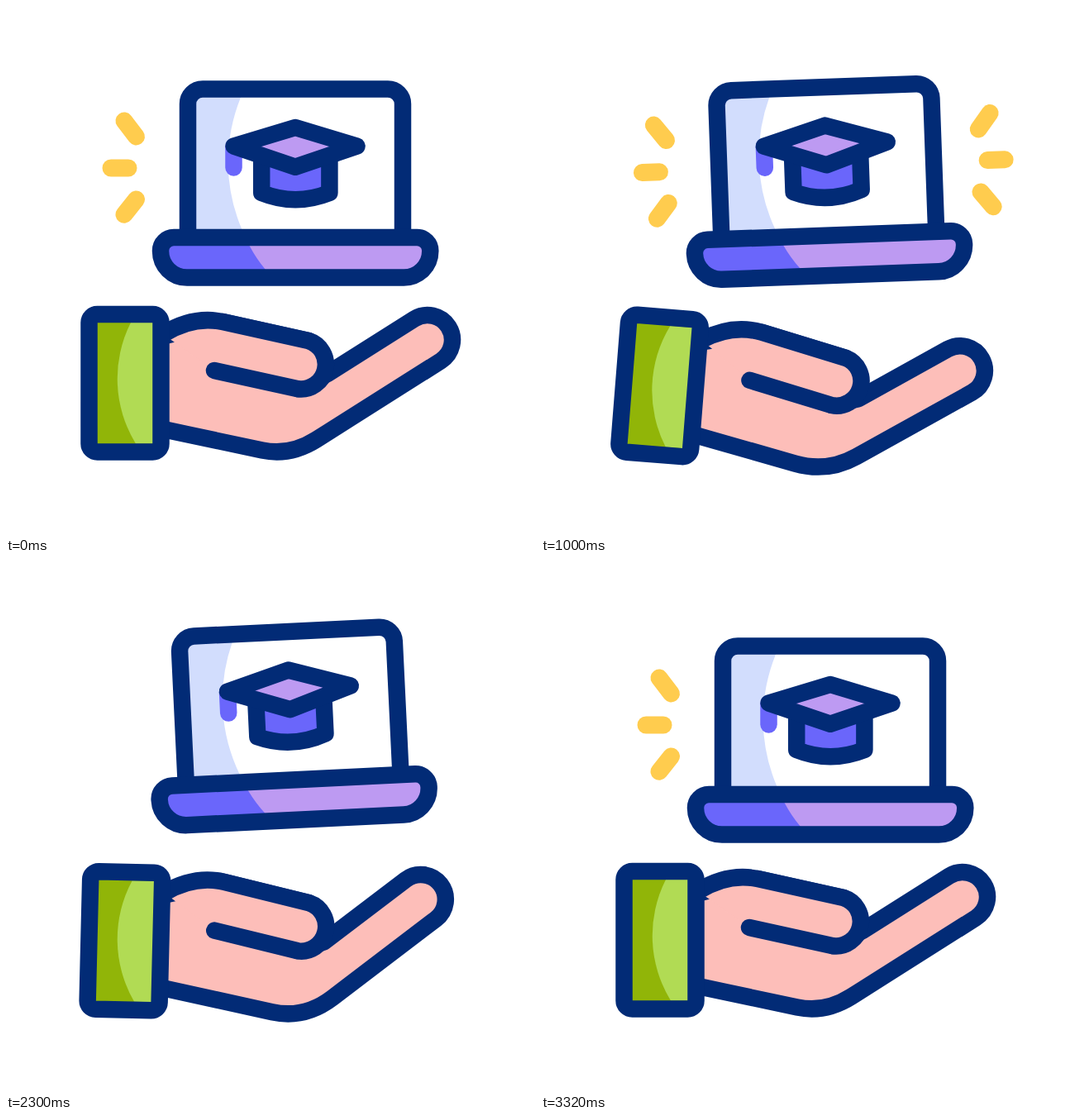
Recreate the animation shown at these times as an HTML page. Size 640x640 px, loop 3.4 s.

```html
<!DOCTYPE html>
<html lang="en">
<head>
<meta charset="utf-8">
<title>Learning in hand</title>
<style>
  html, body { margin: 0; width: 100%; height: 100%; overflow: hidden; background: #fff; }
  svg { display: block; width: 100vw; height: 100vh; }
  .ink { stroke: #022b76; stroke-width: 20.5; stroke-linejoin: round; stroke-linecap: round; }
  .spark { stroke: #ffcc4e; stroke-width: 21; stroke-linecap: round; fill: none; }
  .none { fill: none; }
  .skin { fill: #fdbeb9; }
  .violet { fill: #6a66fb; }
  .lilac { fill: #bd9af2; }
</style>
</head>
<body>
<svg viewBox="0 0 640 640">
  <g id="hand">
    <path id="palm" class="ink skin"/>
    <path class="ink skin" d="M252 441L353.2 463.3A30 30 0 0 0 365.8 404.9L262 382C238 377 214 382 190 397"/>
    <rect x="100.5" y="373" width="87" height="166.5" fill="#91b508"/>
    <path d="M151 383A150 150 0 0 0 157 529.5H180V383Z" fill="#b1db54"/>
    <rect class="ink none" x="100.5" y="373" width="87" height="166.5" rx="10"/>
  </g>
  <g id="laptop">
    <path d="M220 282V118.5a18 18 0 0 1 18-18H462a18 18 0 0 1 18 18V282Z" fill="#fff"/>
    <path d="M222 282V118.5a18 18 0 0 1 18-18H288L284 110.5A208 208 0 0 0 285.5 270.5L290 282Z" fill="#d2ddfd"/>
    <path class="ink none" d="M220 282V118.5a18 18 0 0 1 18-18H462a18 18 0 0 1 18 18V282"/>
    <path id="base" class="lilac" d="M203 280H497.3a16 16 0 0 1 16 16v.5a32 32 0 0 1-32 32H219a32 32 0 0 1-32-32v-.5a16 16 0 0 1 16-16Z"/>
    <path class="violet" d="M203 280H289L294.5 290Q303 306 314 319L321 328.5H219a32 32 0 0 1-32-32v-.5a16 16 0 0 1 16-16Z"/>
    <use href="#base" class="ink" style="fill-opacity:0"/>
    <path d="M275.5 170V195.5" stroke="#6a66fb" stroke-width="20.5" stroke-linecap="round"/>
    <path class="ink violet" d="M309.2 186V226Q350 242.5 391.4 226V186"/>
    <path class="ink lilac" d="M350 147L424.5 169.5L350 194.7L275.5 169.5Z"/>
  </g>
  <g id="sparks"></g>
</svg>
<script>
const LOOP = 3400, BEAT = 800, HALF = BEAT / 2;

// lift, wrist angle, fingertip x/y, finger angle, heel x/y, finger length
const REST = [0, 0, 510, 404, -32.3, 310, 537.5, 178];
const DOWN = [19, 9, 510.5, 426.5, -26.3, 302, 535.8, 164];
const UP = [-24.3, 0, 498.8, 392.1, -40.9, 328, 538.3, 156];
const POSES = [REST, DOWN, UP, DOWN, UP, DOWN, UP, DOWN, REST];
const TILTS = [[0], [-3], [3], [-3], [0]];

// outer x/y, inner x/y
const RAYS = [[143, 139, 157.5, 158], [127, 196, 148, 196], [143, 252.3, 157.5, 234]];
const MIRROR = 693;

const $ = id => document.getElementById(id);
const ease = (t, a, b) => {
  const u = Math.min(1, Math.max(0, (t - a) / (b - a)));
  return u * u * (3 - 2 * u);
};
const mix = (a, b, k) => a + (b - a) * k;

function sample(keys, step, t) {
  const i = Math.min(keys.length - 2, Math.floor(t / step));
  const k = ease(t, i * step, (i + 1) * step);
  return keys[i].map((v, n) => mix(v, keys[i + 1][n], k));
}

function palmPath(tx, ty, angle, sx, sy, length) {
  const a = angle * Math.PI / 180, c = Math.cos(a), s = Math.sin(a), r = 30;
  const low = [tx - s * r, ty + c * r], top = [tx + s * r, ty - c * r];
  const end = [low[0] - c * length, low[1] - s * length];
  const join = [top[0] - c * 124, top[1] - s * 124];
  // the heel bends around the point where wrist line and finger line meet
  const wx = 180, wy = 509.9, m = (sy - wy) / (sx - wx), n = s / c;
  const x = (end[1] - n * end[0] - wy + m * wx) / (m - n);
  const y = wy + m * (x - wx);
  return `M${wx} ${wy}L${sx} ${sy}Q${x} ${y} ${end}L${low}A${r} ${r} 0 0 0 ${top}L${join}` +
    `L353 463L366 405L262 382L180 402`;
}

const rays = [false, true].flatMap(right => RAYS.map(ray => {
  const el = document.createElementNS("http://www.w3.org/2000/svg", "path");
  el.setAttribute("class", "spark");
  $("sparks").append(el);
  const [x1, y1, x2, y2] = ray;
  return { el, right, p: right ? [MIRROR - x1, y1, MIRROR - x2, y2] : [x1, y1, x2, y2] };
}));

function drawSparks(t) {
  const beat = Math.floor(t / BEAT), u = t % BEAT;
  const head = beat ? ease(u, 0, 120) : 1, tail = ease(u, 220, 340);
  for (const { el, right, p: [x1, y1, x2, y2] } of rays) {
    const on = u < HALF && !(right && (beat === 0 || beat === 4));
    el.style.display = on ? "" : "none";
    el.setAttribute("d", `M${mix(x2, x1, tail)} ${mix(y2, y1, tail)}L${mix(x2, x1, head)} ${mix(y2, y1, head)}`);
  }
}

function draw(t) {
  const [lift, wrist, ...finger] = sample(POSES, HALF, t);
  const [tilt] = sample(TILTS, BEAT, t);
  const float = `translate(0 ${lift}) rotate(${tilt} 350 328)`;
  $("laptop").setAttribute("transform", float);
  $("sparks").setAttribute("transform", t < BEAT ? "" : float);
  $("hand").setAttribute("transform", `rotate(${wrist} 103 452.5)`);
  $("palm").setAttribute("d", palmPath(...finger));
  drawSparks(t);
}

const start = performance.now();
function frame() {
  draw((performance.now() - start) % LOOP);
  requestAnimationFrame(frame);
}
frame();
</script>
</body>
</html>
```
